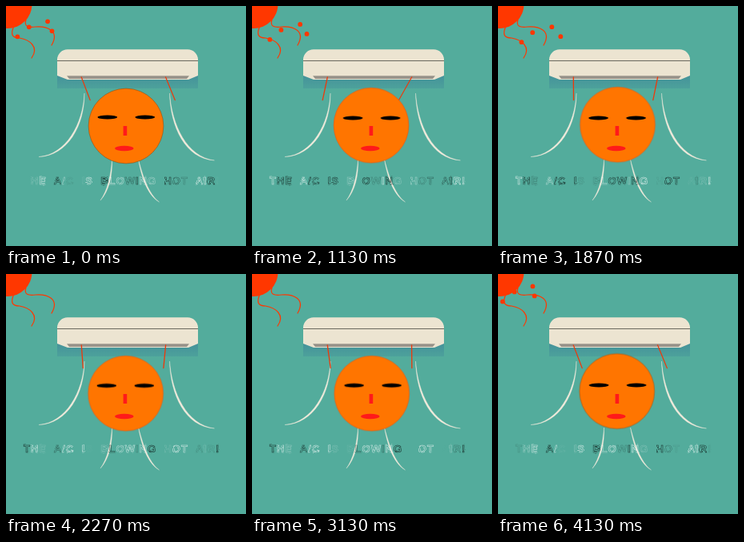
Animation of 300 by 300 pixels, one loop 4.16 s. Source, as an HTML page:

```html
<!DOCTYPE html>
<html lang="en">
<head>
<meta charset="utf-8">
<title>Hot air</title>
<style>
@property --puff { syntax: "<number>"; inherits: true; initial-value: 0; }
@property --swing { syntax: "<number>"; inherits: true; initial-value: 0; }

html, body { margin: 0; height: 100%; overflow: hidden; background: #53ac9c; }
svg { display: block; width: 100vw; height: 100vh; }

.rays, .flaps { fill: none; stroke-linecap: round; }
.rays { stroke: #ff3700; stroke-width: 1.2; }
.limbs { fill: #f0eadb; stroke: #f0eadb; stroke-width: .35; }
.flaps { stroke: #ee380a; stroke-width: 1.3; }

.dots { fill: #ff3700; animation: puff 832ms linear infinite; }
.dots circle {
  transform: translate(calc(var(--puff) * var(--dx) * 1px), calc(var(--puff) * 21px));
}
.flaps { animation: swing 832ms linear infinite; }
.flaps .left { transform: matrix(1, 0, calc(.38 - .59 * var(--swing)), 1, 94.3, 89); }
.flaps .right { transform: matrix(1, 0, calc(.41 - .97 * var(--swing)), 1, 199.6, 89); }

.head { fill: #ff7500; stroke-width: .5; animation: drift 4160ms linear infinite, rim 832ms linear infinite; }
.eyes { animation: look 4160ms linear infinite; }
.words {
  font: bold 13px "Liberation Sans", Arial, sans-serif;
  letter-spacing: 1px;
  word-spacing: 4.7px;
  fill: none;
  stroke-width: .55;
  filter: url(#rough);
}
.words tspan { animation: ink 832ms linear infinite; }

@keyframes puff {
  0%, 100% { --puff: .67; }
  10% { --puff: .87; }
  20%, 25% { --puff: 1; }
  29.1% { --puff: .98; }
  35.8% { --puff: .85; }
  50% { --puff: .45; }
  65% { --puff: .08; }
  75.7% { --puff: 0; }
  85% { --puff: .12; }
  96.4% { --puff: .48; }
}
@keyframes swing {
  0%, 96.4%, 100% { --swing: 0; }
  10% { --swing: .2; }
  20.9% { --swing: .52; }
  24.8% { --swing: .63; }
  29.1% { --swing: .74; }
  35.8% { --swing: 1; }
  46% { --swing: 1.15; }
  60% { --swing: .95; }
  75.7% { --swing: .43; }
  88% { --swing: .1; }
}
@keyframes drift {
  0%, 100% { transform: translate(0, 0); }
  15.1% { transform: translate(0, .5px); }
  27.2% { transform: translate(-1px, -.8px); }
  45% { transform: translate(-.5px, -1.7px); }
  64.2% { transform: translate(-.3px, .3px); }
  85.8% { transform: translate(-.3px, -1.7px); }
  99.3% { transform: translate(-1.3px, -3.5px); }
}
@keyframes rim {
  0%, 100% { stroke: #7a4a18; }
  20%, 80% { stroke: #ee4a08; }
}
@keyframes look {
  0%, 100% { transform: translate(0, 0); }
  15.1% { transform: translate(-.5px, 1.5px); }
  27.2% { transform: translate(-.7px, 1px); }
  45% { transform: translate(-1.3px, 1px); }
  64.2% { transform: translate(-.7px, 0); }
  85.8% { transform: translate(2.2px, .5px); }
  99.3% { transform: translate(-.7px, 0); }
}
@keyframes ink {
  0%, 100% { stroke: #fff0; }
  15%, 35% { stroke: #ffffffc4; }
  49.9% { stroke: #fff0; }
  50% { stroke: #0000; }
  65%, 85% { stroke: #000000b8; }
  99.9% { stroke: #0000; }
}
</style>
</head>
<body>
<svg viewBox="0 0 300 300">
  <defs>
    <linearGradient id="air" x2="0" y2="1">
      <stop offset="0" stop-color="#43909a"/>
      <stop offset="1" stop-color="#4da19b"/>
    </linearGradient>
    <filter id="rough" x="-2%" y="-30%" width="104%" height="160%">
      <feTurbulence type="fractalNoise" baseFrequency=".2" seed="4"/>
      <feDisplacementMap in="SourceGraphic" scale="3" xChannelSelector="R" yChannelSelector="G"/>
    </filter>
  </defs>

  <g class="rays">
    <path d="M10 25C5 36 8 40 17 40C29 42 42 51 32 65"/>
    <path d="M25 17C22 26 28 27 37 26C50 25 68 30 57 49"/>
  </g>
  <g class="dots">
    <circle cx="-16.6" cy="24.2" r="2.9" style="--dx:46"/>
    <circle cx="-.8" cy="12.2" r="2.9" style="--dx:44"/>
    <circle cx="14.8" cy="17.2" r="2.9" style="--dx:63.5"/>
    <circle cx="20.8" cy="5.2" r="2.9" style="--dx:46.5"/>
  </g>
  <circle cx="2" cy="-2.5" r="30.5" fill="#ff3700"/>

  <path d="M64 84H240V103H64Z" fill="url(#air)"/>
  <path d="M64 87V67A13 13 0 0 1 77 54.2H227A13 13 0 0 1 240 67V87L228 92H77Z" fill="#ece4d1"/>
  <path d="M64 68.5H240" stroke="#4b4942" stroke-width=".8"/>
  <path d="M76 87.2H229L226 91H79Z" fill="#98938a"/>

  <g class="limbs">
    <path d="M98 109C98.5 149 77 187.5 41 188.5C75 186 96.5 147 98 109Z"/>
    <path d="M204.5 109C205.5 151 224 191 260.5 193C226 188.5 207.5 149 204.5 109Z"/>
    <path d="M132.5 192C133.2 212 129 231 118 243C127 230.5 131 212 132.5 192Z"/>
    <path d="M165.5 192C169 212 176 236 191.5 245C178 235 171 212 165.5 192Z"/>
  </g>
  <g class="flaps">
    <path class="left" d="M0 0V28.5"/>
    <path class="right" d="M0 0V28.5"/>
  </g>

  <circle class="head" cx="150" cy="150" r="46.9"/>
  <g class="eyes">
    <ellipse cx="126.8" cy="139" rx="12.3" ry="2.5"/>
    <ellipse cx="173.8" cy="139" rx="12.3" ry="2.5"/>
  </g>
  <g fill="#ff1a1a">
    <rect x="146.6" y="150" width="4.6" height="12"/>
    <ellipse cx="147.8" cy="178" rx="11.8" ry="3.3"/>
  </g>

  <text class="words" x="22" y="222.5" xml:space="preserve"></text>
</svg>
<script>
const words = document.querySelector('.words');
let seed = 11;
const random = () => (seed = seed * 16807 % 2147483647) / 2147483647;

for (const letter of "THE A/C IS BLOWING HOT AIR!") {
  const span = document.createElementNS('http://www.w3.org/2000/svg', 'tspan');
  span.textContent = letter;
  span.style.animationDelay = `${-Math.round(random() * 832)}ms`;
  words.append(span);
}
</script>
</body>
</html>
```
